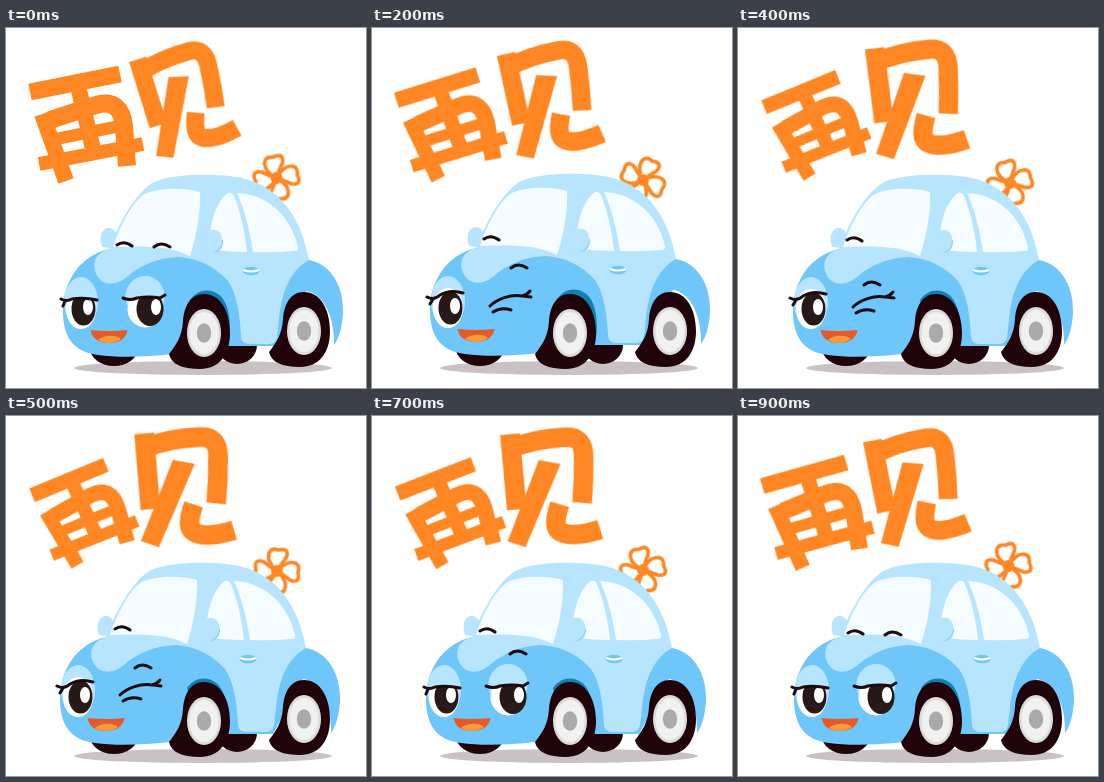
Animation, 360 px wide and 360 px high, one loop 1 s. Source, as an HTML page:

```html
<!DOCTYPE html>
<html lang="zh">
<head>
<meta charset="utf-8">
<title>再见</title>
<style>
html, body { margin: 0; width: 100%; height: 100%; overflow: hidden; background: #fff; }
svg { display: block; width: 100vw; height: 100vh; }

/* every part holds its pose for a tenth of the loop */
.move { animation: 1s step-end infinite; }
.car { animation-name: car; }
.flower { animation-name: flower; }
.zai { animation-name: zai; transform-origin: 70px 116px; }
.jian { animation-name: jian; transform-origin: 178px 72px; }
.browL { animation-name: browL; }
.browR { animation-name: browR; }
.mouth { animation-name: mouth; transform-origin: 103px 307px; }
.open { animation-name: open; }
.wink { animation-name: wink; }

@keyframes car {
  0%, 30% { transform: none; }
  10% { transform: translate(2px, -3px); }
  20% { transform: translate(1px, -1px); }
  40% { transform: translate(-2px, 0); }
  50% { transform: translate(-3px, 0); }
  60% { transform: translate(-4px, 0); }
  70% { transform: translate(-3px, 0); }
  80% { transform: translate(-2px, 0); }
  90%, 100% { transform: translate(-1px, 0); }
}
@keyframes flower {
  0% { transform: translate(270.5px, 150px) rotate(-9deg); }
  10% { transform: translate(271.5px, 148.5px) rotate(38deg); }
  20% { transform: translate(271px, 152px) rotate(26deg); }
  30% { transform: translate(271px, 154px) rotate(16deg); }
  40% { transform: translate(272px, 155px) rotate(-14deg); }
  50% { transform: translate(271px, 155px) rotate(4deg); }
  60% { transform: translate(270px, 154px) rotate(20deg); }
  70% { transform: translate(271px, 154px) rotate(-12deg); }
  80% { transform: translate(271px, 152px) rotate(4deg); }
  90%, 100% { transform: translate(270.5px, 150px) rotate(-9deg); }
}
@keyframes zai {
  0% { transform: none; }
  10% { transform: translate(1px, 0) rotate(-3.3deg) scale(.96); }
  20% { transform: translate(2px, 0) rotate(-6deg) scale(.93); }
  30% { transform: translate(3px, 0) rotate(-9deg) scale(.89); }
  40%, 60% { transform: translate(4px, 0) rotate(-11deg) scale(.87); }
  70% { transform: translate(3.6px, 0) rotate(-9.8deg) scale(.885); }
  80% { transform: translate(2.6px, 0) rotate(-7.4deg) scale(.91); }
  90%, 100% { transform: translate(1.6px, 0) rotate(-4.4deg) scale(.95); }
}
@keyframes jian {
  0% { transform: rotate(-15deg) scale(.9); }
  10% { transform: rotate(-12.5deg) scale(.915); }
  20% { transform: rotate(-10deg) scale(.93); }
  30% { transform: rotate(-7.5deg) scale(.95); }
  40% { transform: rotate(-5deg) scale(.967); }
  50% { transform: rotate(-2.5deg) scale(.985); }
  60% { transform: none; }
  70% { transform: rotate(-3deg) scale(.98); }
  80% { transform: rotate(-6deg) scale(.96); }
  90%, 100% { transform: rotate(-9deg) scale(.94); }
}
@keyframes browL {
  0%, 80% { transform: none; }
  10% { transform: translate(-1px, -1px); }
  20%, 40% { transform: translate(0, -5px); }
  50%, 60% { transform: translate(1px, -4px); }
  70% { transform: translate(0, -2px); }
  90%, 100% { transform: none; }
}
@keyframes browR {
  0% { transform: none; }
  10% { transform: translate(-1px, 4px); }
  20% { transform: translate(-10px, 22px); }
  30%, 40% { transform: translate(-20px, 38px); }
  50% { transform: translate(-16px, 33px); }
  60% { transform: translate(-11px, 28px); }
  70% { transform: translate(-7px, 19px); }
  80% { transform: translate(-3px, 9px); }
  90%, 100% { transform: none; }
}
@keyframes mouth {
  0%, 20% { transform: none; }
  10% { transform: translate(-2px, 3px) scale(.78, .82); }
  30%, 100% { transform: none; }
}
@keyframes open {
  0%, 70%, 100% { visibility: visible; }
  10% { visibility: hidden; }
}
@keyframes wink {
  0%, 70%, 100% { visibility: hidden; }
  10% { visibility: visible; }
}

.ink { fill: none; stroke: #1c0b0f; stroke-width: 3; stroke-linecap: round; stroke-linejoin: round; }
.pupil { fill: #261917; }
.tire { fill: #210409; }
.blue { fill: #6ec6fa; }
.light { fill: #b7e4ff; }
.glass { fill: #f5fcff; }
.white { fill: #fff; }
.letter { fill: none; stroke: #ff8723; }
</style>
</head>
<body>
<svg viewBox="0 0 360 360" role="img" aria-label="再见">
  <defs>
    <path id="petal" d="M0 0C-7-5-11-12-9-18Q-7-23 0-21Q9-24 9-17C9-12 3-9 2-2Z"/>
    <g id="wheel">
      <path class="tire" d="M0-39C-14-39-20-26-21-12C-22 4-28 12-35 21C-33 31-22 36-4 36C15 36 26 22 26 0C26-22 16-39 0-39Z"/>
      <ellipse rx="17" ry="24" fill="#dcdcdc"/>
      <ellipse rx="14.5" ry="21" fill="#f1f1f1"/>
      <ellipse rx="7.2" ry="9.8" fill="#aaa"/>
    </g>
  </defs>

  <ellipse cx="197" cy="340" rx="129" ry="7" fill="#c9c1c3"/>
  <ellipse class="tire" cx="108" cy="320" rx="24" ry="18"/>
  <ellipse class="tire" cx="231" cy="317" rx="20" ry="19"/>

  <g class="move flower">
    <g fill="#fff" stroke="#ff8723" stroke-width="3.6" stroke-linejoin="round">
      <use href="#petal"/>
      <use href="#petal" transform="rotate(90)"/>
      <use href="#petal" transform="rotate(180)"/>
      <use href="#petal" transform="rotate(270)"/>
    </g>
    <circle r="6" fill="#ff8723"/>
  </g>

  <g class="move car">
    <!-- lower body and rear fender -->
    <path class="blue" d="M57 286C56 255 73 228 103 221L185 222L303 232C326 236 338 260 337 285C336 300 333 310 328 317C329 294 320 266 300 263L270 318H200L166 326C140 329 112 330 92 327C68 324 58 310 57 286Z"/>
    <!-- cabin and door -->
    <path class="light" d="M103 221C112 198 126 169 146 155C166 145 211 145 236 150C276 159 296 193 303 232C285 242 276 262 273 292L271 309Q270 316 263 316H243Q236 316 235 309C234 287 231 266 222 253C208 237 190 230 172 229C150 230 134 238 122 248C110 259 94 259 89 243C86 232 92 224 103 221Z"/>
    <ellipse class="light" cx="75" cy="274" rx="17" ry="25"/>
    <path class="light" d="M96 219C92 207 97 199 104 200Q109 201 111 207L105 220Z"/>
    <path class="glass" d="M107 219C115 195 128 172 139 166C155 159 179 160 194 164C195 187 189 214 184 228C163 217 133 218 107 219Z"/>
    <path class="glass" d="M203 221C203 198 209 174 222 165Q226 164 228 168C235 185 239 205 241 224C227 224 215 223 203 221Z"/>
    <path class="glass" d="M231 165C260 166 285 187 292 219Q293 223 288 223Q266 225 247 224C244 203 239 183 231 165Z"/>
    <path fill="#8dd3fb" d="M203 224C211 228 218 221 217 211L211 220Z"/>
    <path class="light" d="M199 226V207C204 199 215 200 216 210C217 220 210 226 199 226Z"/>
    <ellipse class="blue" cx="245" cy="243" rx="8.5" ry="4.3"/>
    <path d="M237 242Q245 245 253 242" fill="none" stroke="#fff" stroke-width="2"/>
    <path fill="#147fae" d="M184 272C193 259 209 260 217 271C225 283 225 303 222 316H195Z"/>

    <!-- left eye -->
    <ellipse class="white" cx="75" cy="281" rx="15" ry="20"/>
    <ellipse class="pupil" cx="77.5" cy="281" rx="12" ry="16.5"/>
    <ellipse class="white" cx="82" cy="279" rx="5" ry="8"/>
    <g class="move open">
      <path class="light" d="M58 272C61 248 87 246 92 272Q76 269 58 272Z"/>
      <path class="ink" d="M55 271Q60 274 66 271Q78 269 91 272M59 273L57 278"/>
    </g>
    <g class="move wink">
      <path class="ink" d="M54 270Q61 274 67 268Q77 262 90 266M60 272L57 277"/>
    </g>

    <!-- right eye -->
    <g class="move open">
      <ellipse class="light" cx="139" cy="269" rx="19.5" ry="21"/>
      <ellipse class="white" cx="139" cy="281" rx="17.5" ry="18.5"/>
      <ellipse class="pupil" cx="144" cy="281" rx="13.5" ry="17"/>
      <ellipse class="white" cx="150" cy="279" rx="5" ry="8"/>
      <path class="light" d="M119.5 271C119 242 158 240 158.5 269Q138 268 119.5 271Z"/>
      <path class="ink" d="M117 270Q124 273 131 270Q143 268 154 270L159 267"/>
    </g>
    <g class="move wink">
      <path class="ink" d="M117 279C124 272 138 267 149 269Q154 268 157 264M150 269L158 270M120 285C126 281 132 281 138 283"/>
    </g>

    <g class="move browL">
      <path class="ink" stroke-width="3.4" d="M111 217Q118 212 126 218"/>
    </g>
    <g class="move browR">
      <path class="ink" stroke-width="3.4" d="M148 219Q155 213 164 219"/>
    </g>

    <g class="move mouth">
      <path fill="#e65a28" d="M84.5 302Q103 304 121.5 302C120 311 113 315 102 315C92 315 86 310 84.5 302Z"/>
      <path fill="#f79a3c" d="M92 312C97 307 110 306 115 311C108 316 98 316 92 312Z"/>
    </g>
  </g>

  <use href="#wheel" x="198" y="305"/>
  <use href="#wheel" x="298" y="303"/>

  <g class="move zai letter">
    <path stroke-width="17" d="M24 64L114 46"/>
    <path stroke-width="16" d="M36 86L60 153"/>
    <path stroke-width="18" d="M44 92L90 77Q115 70 118 98L121 138"/>
    <path stroke-width="12" d="M50 111L114 98"/>
    <path stroke-width="14" d="M33 136L137 116"/>
    <path stroke-width="16" d="M72 58L88 125"/>
  </g>
  <g class="move jian letter" stroke-width="20">
    <path d="M140 15L143 92"/>
    <path d="M139 30C162 22 184 21 197 21Q215 21 214 42Q213 66 210 89"/>
    <path d="M187 89C181 105 179 115 190 119C200 123 215 120 227 117"/>
    <path fill="#ff8723" stroke="none" d="M168 43L190 48L150 131L132 124Z"/>
  </g>
</svg>
</body>
</html>
```
